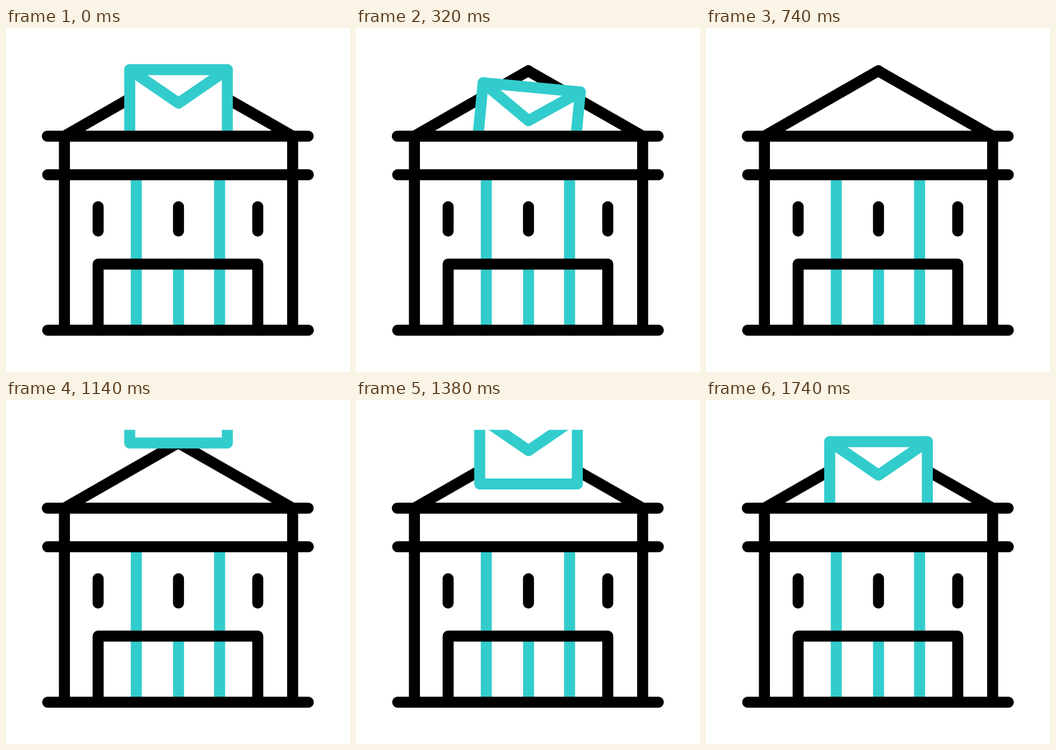
An HTML page that plays this animation: 640 px wide and 640 px high, repeating every 3600 ms.

```html
<!DOCTYPE html>
<html>
<head>
<meta charset="utf-8">
<style>
  html, body { margin: 0; height: 100%; overflow: hidden; background: #fff; }
  svg { display: block; width: 100%; height: 100%; }
  path { fill: none; stroke: #000; stroke-width: 20.5; stroke-linecap: round; stroke-linejoin: round; }
  .teal { stroke: #3cc; }
  .paper { fill: #fff; }
</style>
</head>
<body>
<svg viewBox="0 0 640 640">
  <clipPath id="slot"><rect y="55.5" width="640" height="145.5"/></clipPath>
  <path d="M108.7 201.2 321 79.4M321 80.2 533.3 201.2"/>
  <g clip-path="url(#slot)">
    <g id="letter">
      <path class="teal paper" d="M230.2 77.6H411.8V202H230.2Z"/>
      <path class="teal" d="M230.2 77.6 321 139.8 411.8 77.6"/>
    </g>
  </g>
  <path class="teal" d="M242.4 273V562M321 439V562M397.4 273V562"/>
  <path d="M76.8 201.2H562.2M77.5 273H562.5M77.5 562.2H562.5M108.7 201.2V562M533.3 201.2V562"/>
  <path d="M171.4 332.5V377.7M320.9 332.5V377.7M468.4 332.5V377.7M171.4 562V439.3H468.4V562"/>
</svg>
<script>
  const LOOP = 3600, STEP = 20, MOVE = 760, RETURN = 1000;
  const TRAVEL = 183.4, TILT = 30.5;
  const letter = document.getElementById('letter');

  function draw() {
    const t = Math.floor(performance.now() % LOOP / STEP) * STEP;
    let y, angle = 0;
    if (t < RETURN) {
      // sinks into the building, tilting
      const k = Math.min(t / MOVE, 1) ** 2;
      y = TRAVEL * k;
      angle = TILT * k;
    } else {
      // drops in from above, slowing down
      y = -TRAVEL * (1 - Math.min((t - RETURN) / MOVE, 1)) ** 2;
    }
    letter.setAttribute('transform', `translate(0 ${y}) rotate(${angle} 321 139.8)`);
    requestAnimationFrame(draw);
  }
  draw();
</script>
</body>
</html>
```
